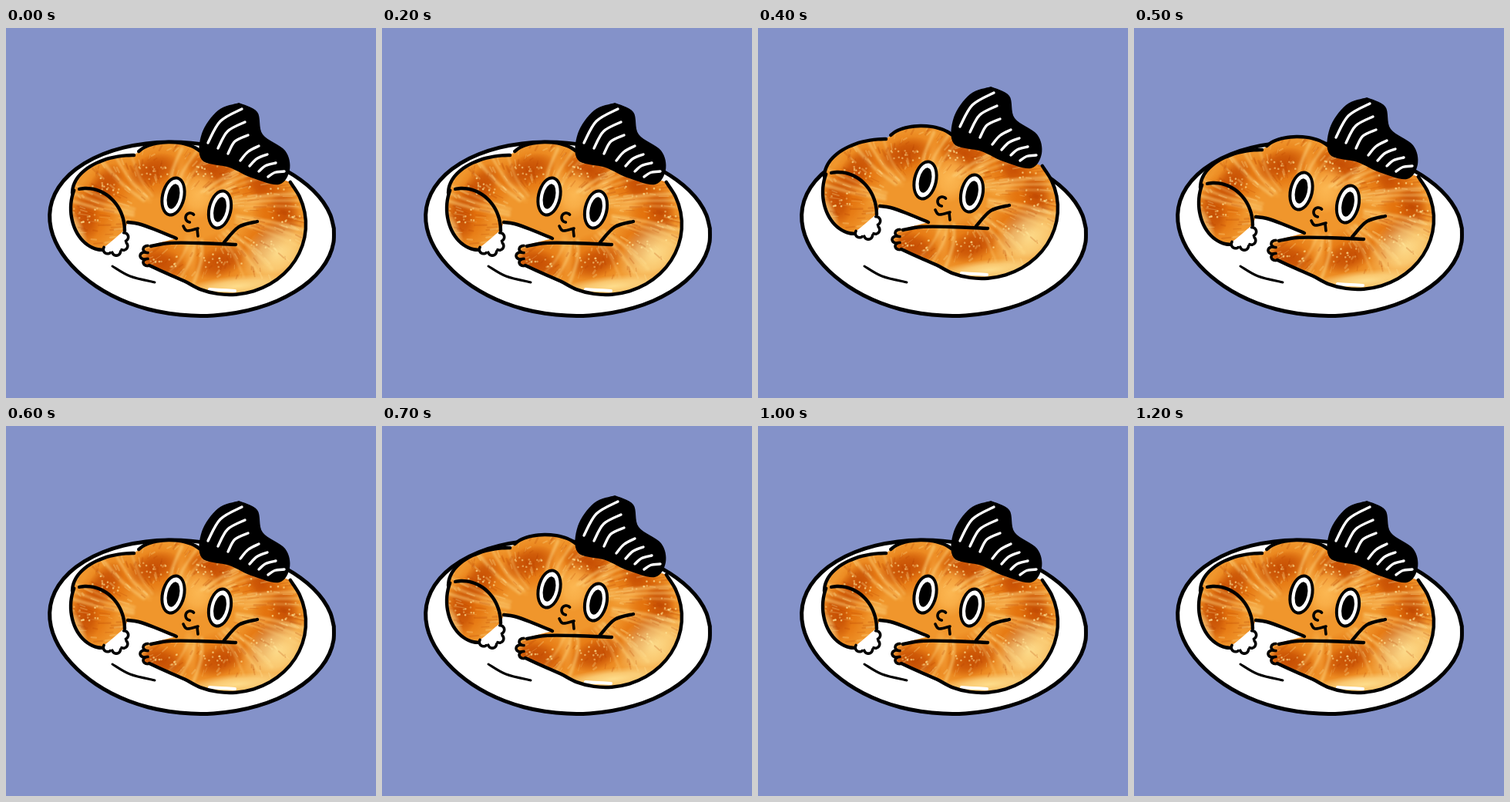
An HTML page with a canvas for the animation above (1250 ms loop, 480 px wide and 480 px high).

```html
<!DOCTYPE html>
<html lang="en">
<head>
<meta charset="utf-8">
<title>Croissant</title>
<style>
html, body { margin: 0; width: 100%; height: 100%; overflow: hidden; background: #8492c9; }
canvas { display: block; width: 480px; height: 480px; }
</style>
</head>
<body>
<canvas id="stage" width="480" height="480"></canvas>
<script>
const ctx = document.getElementById('stage').getContext('2d');
const { PI, sin, cos } = Math;
const STEP = 100, LOOP = 1250;
const LIFT = [0, 7, 0, 7, 21, 7, 0, 7];
const BLINKS = [9, 11];

const range = n => Array.from({ length: n }, (_, i) => i);

// Points on an elliptical arc from angle a to b; bend varies the radius.
function arc(x, y, rx, ry, a, b, bend = () => 1, n = 12) {
  return range(n + 1).map(i => {
    const t = a + (b - a) * i / n, k = bend(t);
    return [x + rx * k * cos(t), y + ry * k * sin(t)];
  });
}

// Adds a smooth curve through points to a path.
function trace(path, pts, start = true) {
  const at = i => pts[Math.max(0, Math.min(pts.length - 1, i))];
  path[start ? 'moveTo' : 'lineTo'](...pts[0]);
  for (let i = 0; i < pts.length - 1; i++) {
    const [a, b, c, d] = [at(i - 1), at(i), at(i + 1), at(i + 2)];
    path.bezierCurveTo(
      b[0] + (c[0] - a[0]) / 6, b[1] + (c[1] - a[1]) / 6,
      c[0] - (d[0] - b[0]) / 6, c[1] - (d[1] - b[1]) / 6, ...c);
  }
  return path;
}

const curve = pts => trace(new Path2D(), pts);

function join(...parts) {
  const path = new Path2D();
  parts.forEach((p, i) => trace(path, p, i === 0));
  path.closePath();
  return path;
}

function ink(g, path, width = 4.4, color = '#000') {
  g.strokeStyle = color;
  g.lineWidth = width;
  g.lineCap = g.lineJoin = 'round';
  g.stroke(path);
}

// Plate: an ellipse pulled slightly towards the upper left.
const wobble = t => 1 + 0.052 * sin(2 * t) + 0.01 * (cos(3 * t) - sin(3 * t));
const PLATE = join(arc(240, 260, 183.5, 112, 0, 2 * PI, wobble, 40));
const PLATE_MARK = curve([[138, 309], [161, 322], [193, 330]]);

// Pastry outline, clockwise from the left shoulder.
const BACK = arc(166, 214, 80, 49, -PI, -PI / 2);
const HUMP = arc(212, 169, 44, 21, -2.7, -0.5);
const SIDE = [...arc(290, 255, 99, 91, -0.65, 2.2), [210, 319], [186, 308]];
const FINGERS = range(3).map(i => arc(184 - 4 * (i % 2), 304 - 8.5 * i, 6, 4.6, PI / 2, 1.5 * PI));
const HOLLOW = [[221, 273], [192, 261], [172, 254], [158, 252]];
const LEFT_SIDE = arc(126, 234, 42, 54, PI / 2, PI + 0.45);
const LEFT_ARM = arc(104, 263, 50, 55, -1.75, 0);
const ARM_TOP = [[188, 283], [212, 279], [250, 279], [298, 281]];
const SHOULDER = [[283, 278], [302, 258], [326, 251]];

const LEFT_FINGERS = range(4).map(i => {
  const a = 0.85 * i - 0.35;
  return arc(140 + 14 * cos(a), 276 + 14 * sin(a), 5.5, 5.5, a - 1.3, a + 1.5);
});

const BODY = join(BACK, HUMP, SIDE, ...FINGERS, HOLLOW, [[154, 262], [124, 288]], LEFT_SIDE);
const LEFT_HAND = join(...LEFT_FINGERS);
const BODY_LINES = [BACK, HUMP, SIDE, ARM_TOP, HOLLOW, LEFT_SIDE, LEFT_ARM, SHOULDER].map(curve);
const HAND_LINES = [...FINGERS, ...LEFT_FINGERS].map(curve);

const HAIR = join([
  [302, 97], [326, 109], [333, 138], [362, 159], [368, 184], [354, 203],
  [318, 194], [290, 181], [254, 171], [254, 137], [275, 107], [302, 97]
]);

// A slightly bowed stroke between two points.
const bow = (x, y, u, v, k) => curve([[x, y], [(x + u) / 2 - k, (y + v) / 2 - k], [u, v]]);
const STREAKS = [
  ...range(3).map(i => bow(262 + 13 * i, 149 + 7 * i, 306 + 4 * i, 105 + 17 * i, 6 - i)),
  ...range(4).map(i => bow(304 + 12 * i, 172 + 7 * i, 328 + 11 * i, 153 + 11 * i, 2))
];

const LIDS = [[217, 213], [277, 230]].map(([x, y]) =>
  curve([[x - 13, y - 5], [x - 13, y + 20], [x - 3, y + 27], [x + 8, y + 20], [x + 15, y + 4]]));
const FACE = [
  arc(239, 246, 6, 6, -0.7, -4.6),
  [[230, 257], [235, 263], [249, 260]],
  [[248, 261], [249, 270]]
].map(curve);

let seed = 7;
const rnd = () => (seed = seed * 16807 % 2147483647) / 2147483647;

function blob(g, x, y, rx, ry, turn, rgb, alpha) {
  g.save();
  g.translate(x, y);
  g.rotate(turn);
  g.scale(rx, ry);
  const fade = g.createRadialGradient(0, 0, 0, 0, 0, 1);
  fade.addColorStop(0, `rgba(${rgb},${alpha})`);
  fade.addColorStop(0.5, `rgba(${rgb},${alpha * 0.7})`);
  fade.addColorStop(1, `rgba(${rgb},0)`);
  g.fillStyle = fade;
  g.fillRect(-1, -1, 2, 2);
  g.restore();
}

// Baked segments follow a ring through both arms and the head.
const ring = (a, k = 1) => [232 + 112 * k * cos(a), 244 + 55 * k * sin(a)];

function bake() {
  const c = document.createElement('canvas');
  c.width = c.height = 480;
  const g = c.getContext('2d');
  const brown = '188,66,0', amber = '224,104,4', cream = '255,228,150', gold = '255,192,92';
  const gap = 0.62;
  g.clip(BODY);
  g.fillStyle = '#f0962c';
  g.fillRect(0, 0, 480, 480);

  for (let i = 0; i < 9; i++) {
    const a = gap * i - PI;
    blob(g, ...ring(a, 1.08), 48, 34, a + PI / 2, amber, 0.8);
    blob(g, ...ring(a, 1.15), 36, 20, a + PI / 2, brown, 0.75);
    blob(g, ...ring(a + gap / 2, 0.9), 30, 10, a + gap / 2, gold, 0.6);
  }
  blob(g, 250, 215, 26, 34, 0.3, gold, 0.8);
  blob(g, 352, 292, 52, 38, -0.6, cream, 0.9);
  blob(g, 300, 335, 74, 14, -0.1, cream, 0.9);
  blob(g, 92, 262, 10, 30, -0.4, cream, 0.6);

  g.filter = 'blur(1.4px)';
  for (let i = 0; i < 8; i++) {
    const a = gap * (i + 0.5) - PI;
    for (let j = 0; j < 3; j++) {
      const b = a + (j - 1) * 0.12;
      const line = curve([ring(b - 0.15, 0.6), ring(b, 1.05), ring(b + 0.12, 1.6)]);
      ink(g, line, 4 - j, 'rgba(255,220,135,.5)');
    }
  }

  g.filter = 'blur(.5px)';
  for (let i = 0; i < 420; i++) {
    const a = rnd() * 2 * PI, k = 0.6 + rnd() * 1.1, len = 0.03 + rnd() * 0.12;
    const tone = rnd() < 0.5 ? 'rgba(255,225,150,.28)' : 'rgba(180,62,0,.22)';
    ink(g, curve([ring(a, k), ring(a + 0.03, k + len)]), 0.8 + rnd() * 2, tone);
  }
  for (let i = 0; i < 140; i++) {
    const [x, y] = ring(gap * (i % 9) - PI + (rnd() - 0.5) * 0.35, 0.95 + rnd() * 0.4);
    blob(g, x, y, 1.8, 1.8, 0, cream, 0.4 + rnd() * 0.5);
  }
  g.filter = 'none';
  ink(g, bow(264, 339, 297, 341, 0), 4, '#fff');
  return c;
}
const bread = bake();

function oval(x, y, rx, ry, color) {
  ctx.fillStyle = color;
  ctx.beginPath();
  ctx.ellipse(x, y, rx, ry, 0.22, 0, 2 * PI);
  ctx.fill();
}

function eye(x, y) {
  oval(x, y, 16, 26.5, '#000');
  oval(x, y, 12, 22.5, '#fff');
  oval(x, y, 7.8, 16.5, '#000');
}

function draw(lift, shut) {
  ctx.fillStyle = '#8492c9';
  ctx.fillRect(0, 0, 480, 480);
  ctx.fillStyle = '#fff';
  ctx.fill(PLATE);
  ink(ctx, PLATE, 5);
  ink(ctx, PLATE_MARK, 3);

  ctx.save();
  ctx.translate(0, -lift);
  ctx.drawImage(bread, 0, 0);
  ctx.fillStyle = '#fff';
  ctx.fill(LEFT_HAND);
  BODY_LINES.forEach(p => ink(ctx, p));
  HAND_LINES.forEach(p => ink(ctx, p, 3.6));
  ctx.fillStyle = '#000';
  ctx.fill(HAIR);
  STREAKS.forEach(p => ink(ctx, p, 3.4, '#fff'));
  if (shut) {
    LIDS.forEach(p => ink(ctx, p));
  } else {
    eye(217, 218.5);
    eye(277.5, 235.5);
  }
  FACE.forEach(p => ink(ctx, p, 3.6));
  ctx.restore();
}

function tick() {
  const slot = Math.floor(performance.now() % LOOP / STEP);
  draw(LIFT[slot] || 0, BLINKS.includes(slot));
  requestAnimationFrame(tick);
}
tick();
</script>
</body>
</html>
```
